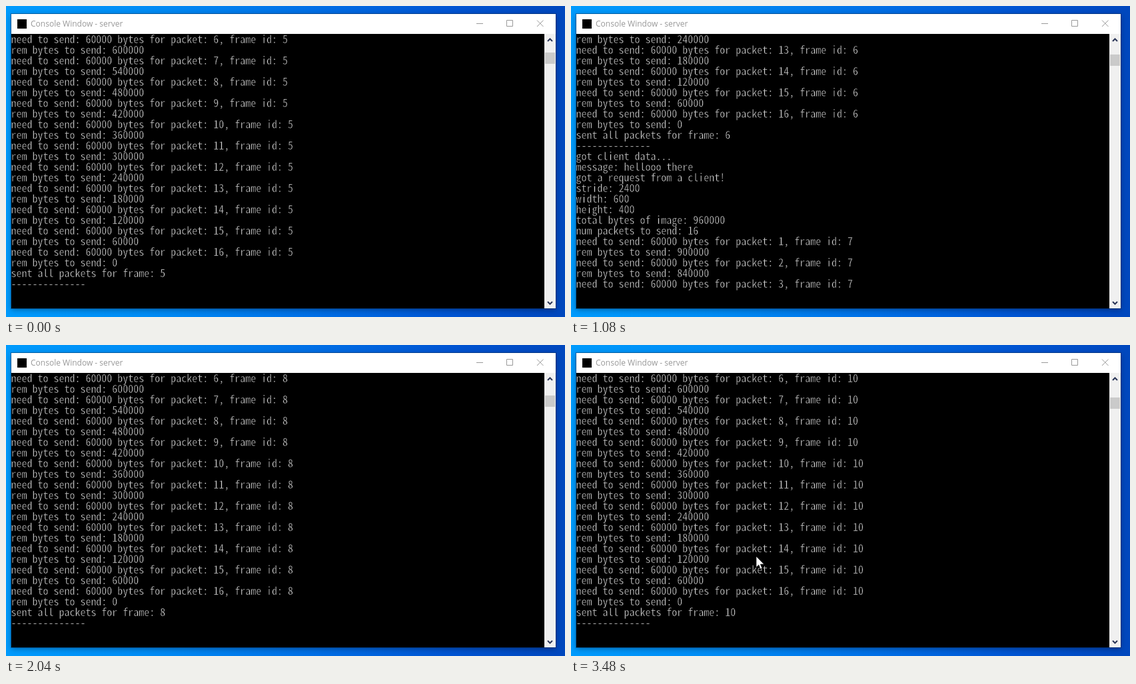
Recreate the animation shown at these times as an HTML page. Size 839 by 468 pixels, loop 3600 ms.

```html
<!DOCTYPE html>
<html lang="en">
<head>
<meta charset="utf-8">
<title>Server log</title>
<style>
  html, body { margin: 0; width: 100%; height: 100%; overflow: hidden; background: #0078e8; }
  svg { display: block; }
  /* The thin black outline slims the letter stems. */
  #log {
    font-family: "Noto Sans Mono CJK JP", "Noto Sans Mono", monospace;
    fill: #d4d4d4; stroke: #000; stroke-width: .4; white-space: pre;
  }
  .window { fill: #fff; filter: drop-shadow(0 2px 4px rgba(0, 0, 0, .35)); }
  .edge { fill: none; stroke: rgba(0, 30, 70, .4); }
  .title { font: 12px "Open Sans", "Noto Sans", sans-serif; fill: #999; }
  .line { fill: none; stroke: #999; }
  .arrow { fill: none; stroke: #2b3658; stroke-width: 2; }
</style>
</head>
<body>
<svg width="839" height="468" viewBox="0 0 839 468">
  <defs>
    <linearGradient id="sky">
      <stop offset="0" stop-color="#009bfd"/>
      <stop offset=".25" stop-color="#008cf5"/>
      <stop offset=".55" stop-color="#006fe6"/>
      <stop offset=".8" stop-color="#0054d2"/>
      <stop offset="1" stop-color="#0047bd"/>
    </linearGradient>
  </defs>
  <rect width="839" height="468" fill="url(#sky)"/>
  <rect class="window" x="8" y="12" width="817" height="443"/>
  <rect class="edge" x="7.5" y="11.5" width="818" height="444"/>
  <rect x="8" y="42" width="800" height="413"/>
  <rect x="17" y="20" width="14" height="14"/>
  <text class="title" x="37" y="31">Console Window - server</text>
  <path class="line" d="M706 26.5h10M751.5 21.5h9v9h-9zM797 21.5l9.5 9.5M806.5 21.5l-9.5 9.5"/>
  <rect x="808" y="42" width="17" height="413" fill="#f0f0f0"/>
  <path class="arrow" d="M813 53l3.5-3.5l3.5 3.5M813 445l3.5 3.5l3.5-3.5"/>
  <rect id="thumb" x="809" width="15" height="17" fill="#cacaca"/>
  <g id="log"></g>
  <path id="pointer" d="M278 318v16.5l3.8-3.6l2.6 6.1l2.5-1.1l-2.6-6h5.4z" fill="#fff" stroke="#000" stroke-width=".6"/>
</svg>
<script>
const ROWS = 24, STEP = 120, LOOP = 3600;
const intro = [
  "got client data...", "message: hellooo there", "got a request from a client!",
  "stride: 2400", "width: 600", "height: 400",
  "total bytes of image: 960000", "num packets to send: 16"
];
const CYCLE = intro.length + 34;
// [step, lines printed so far]
const progress = [[0, 42], [4, 84], [7, 86], [9, 97], [13, 126], [15, 126],
  [17, 168], [23, 210], [24, 210], [25, 213], [29, 252]];

const byId = id => document.getElementById(id);
const log = byId("log"), thumb = byId("thumb"), pointer = byId("pointer");

// Size the font so that one character is 8px wide.
const ctx = document.createElement("canvas").getContext("2d");
ctx.font = "160px " + getComputedStyle(log).fontFamily;
log.style.fontSize = 1280 / ctx.measureText("0").width + "px";

const rows = Array.from({ length: ROWS }, (_, i) => {
  const row = document.createElementNS("http://www.w3.org/2000/svg", "text");
  row.setAttribute("x", 7.5);
  row.setAttribute("y", 56 + i * 16);
  return log.appendChild(row);
});

function lineAt(n) {
  const id = 5 + Math.floor(n / CYCLE), k = n % CYCLE;
  if (k < intro.length) return intro[k];
  if (k === CYCLE - 2) return `sent all packets for frame: ${id}`;
  if (k === CYCLE - 1) return "-".repeat(14);
  const j = k - intro.length, packet = (j >> 1) + 1;
  return j % 2
    ? `rem bytes to send: ${960000 - packet * 60000}`
    : `need to send: 60000 bytes for packet: ${packet}, frame id: ${id}`;
}

function printedAt(step) {
  const i = progress.findIndex(p => p[0] >= step);
  const [s1, n1] = progress[i], [s0, n0] = progress[Math.max(0, i - 1)];
  return s1 === step ? n1 : Math.round(n0 + (n1 - n0) * (step - s0) / (s1 - s0));
}

let shown = -1;
function draw() {
  const step = Math.floor(performance.now() % LOOP / STEP);
  if (step !== shown) {
    shown = step;
    const count = printedAt(step);
    rows.forEach((row, i) => row.textContent = lineAt(count - ROWS + i));
    thumb.setAttribute("y", Math.round(70.2 + (count - 42) * 0.0425));
    pointer.style.display = step === 29 ? "" : "none";
  }
  requestAnimationFrame(draw);
}
draw();
</script>
</body>
</html>
```
